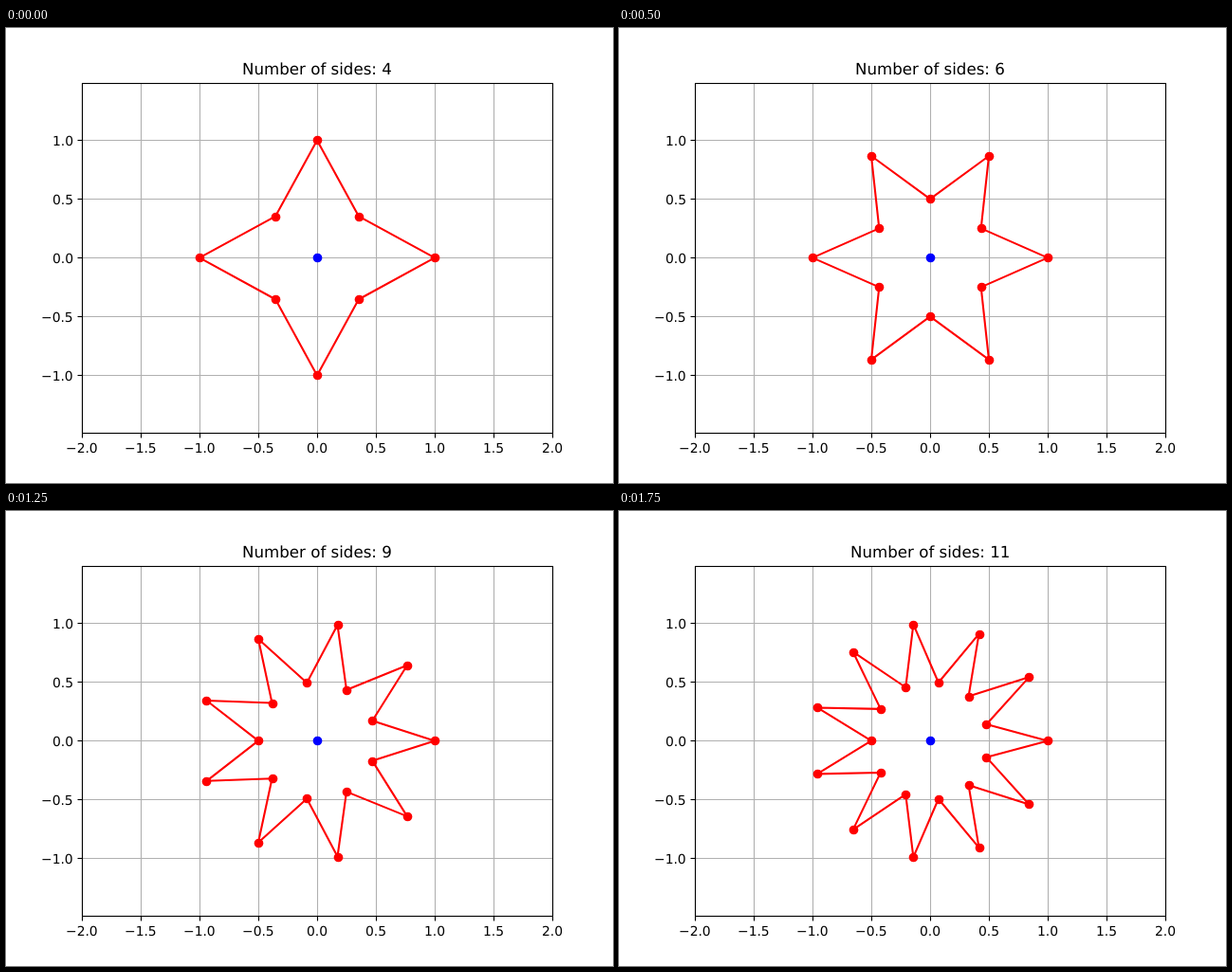
These frames come from a looping animation (640 px wide and 480 px high, 2 s). An HTML page with a canvas:

```html
<!DOCTYPE html>
<html lang="en">
<head>
<meta charset="utf-8">
<title>Star polygons</title>
<style>
  html, body { margin: 0; width: 100%; height: 100%; overflow: hidden; background: #fff; }
  canvas { display: block; }
</style>
</head>
<body>
<canvas id="plot" width="640" height="480"></canvas>
<script>
const ctx = document.getElementById('plot').getContext('2d');
const PT = 100 / 72;                       // pixels per point
const UNIT = 124, CX = 328, CY = 242.4;    // data scale and origin
const LEFT = 80, RIGHT = 576, TOP = 57.6, BOTTOM = 427.2;
const STEP = 250, FIRST = 4, COUNT = 8;

const px = x => CX + x * UNIT;
const py = y => CY - y * UNIT;
const snap = v => Math.floor(v + 0.5 + 1e-9) + 0.5;
const label = v => v.toFixed(1).replace('-', '\u2212');

function line(x1, y1, x2, y2, color) {
  ctx.strokeStyle = color;
  ctx.lineWidth = 0.8 * PT;
  ctx.beginPath();
  ctx.moveTo(x1, y1);
  ctx.lineTo(x2, y2);
  ctx.stroke();
}

// Aligns the inked part of the text: align 0.5 centres it, 1 ends it at x.
function text(str, x, y, size, align) {
  ctx.font = size * PT + 'px "DejaVu Sans", sans-serif';
  ctx.fillStyle = '#000';
  const m = ctx.measureText(str);
  const ink = m.actualBoundingBoxLeft + m.actualBoundingBoxRight;
  ctx.fillText(str, Math.round(x - ink * align) + m.actualBoundingBoxLeft, y);
}

function dot(x, y, color) {
  ctx.fillStyle = color;
  ctx.beginPath();
  ctx.arc(snap(x), snap(y), 3.5 * PT, 0, Math.PI * 2);
  ctx.fill();
}

function range(from, to) {
  const out = [];
  for (let v = from; v <= to; v += 0.5) out.push(v);
  return out;
}

const xTicks = range(-2, 2), yTicks = range(-1, 1);
const x0 = snap(LEFT), x1 = snap(RIGHT), y0 = snap(TOP), y1 = snap(BOTTOM);

function drawGrid() {
  for (const v of xTicks) line(snap(px(v)), y0, snap(px(v)), y1, '#b0b0b0');
  for (const v of yTicks) line(x0, snap(py(v)), x1, snap(py(v)), '#b0b0b0');
}

function drawAxes() {
  for (const v of xTicks) {
    const x = snap(px(v));
    line(x, y1, x, y1 + 5, '#000');
    text(label(v), px(v), 448, 10, 0.5);
  }
  for (const v of yTicks) {
    const y = snap(py(v));
    line(x0 - 5, y, x0, y, '#000');
    text(label(v), LEFT - 7 * PT, Math.round(py(v) + 5.5), 10, 1);
  }
  ctx.strokeStyle = '#000';
  ctx.lineWidth = 0.8 * PT;
  ctx.strokeRect(x0, y0, x1 - x0, y1 - y0);
}

function drawStar(n) {
  const pts = [];
  for (let i = 0; i < 2 * n; i++) {
    const a = Math.PI * i / n, r = i % 2 ? 0.5 : 1;
    pts.push([px(r * Math.cos(a)), py(r * Math.sin(a))]);
  }
  ctx.strokeStyle = '#f00';
  ctx.lineWidth = 1.5 * PT;
  ctx.lineJoin = 'round';
  ctx.beginPath();
  for (const [x, y] of pts) ctx.lineTo(x, y);
  ctx.closePath();
  ctx.stroke();
  ctx.lineJoin = 'miter';
  for (const [x, y] of pts) dot(x, y, '#f00');
}

function draw(n) {
  ctx.fillStyle = '#fff';
  ctx.fillRect(0, 0, 640, 480);
  drawGrid();
  drawStar(n);
  dot(CX, CY, '#00f');
  drawAxes();
  text('Number of sides: ' + n, CX, 49, 12, 0.5);
}

ctx.textRendering = 'geometricPrecision';
const start = performance.now();

function tick(now) {
  const t = Math.max(0, now - start);
  draw(FIRST + Math.floor(t / STEP) % COUNT);
  requestAnimationFrame(tick);
}
tick(start);
</script>
</body>
</html>
```
